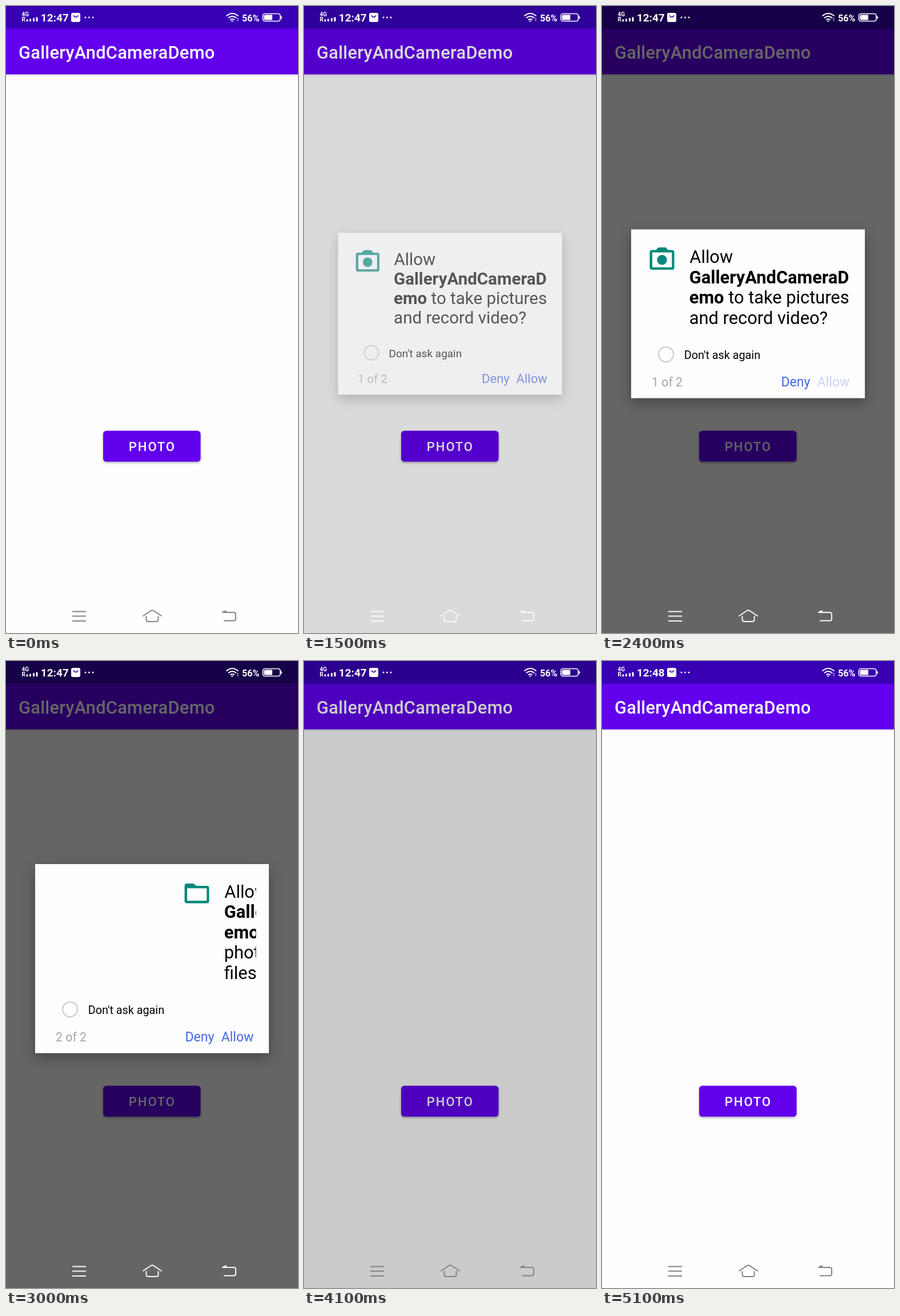
Write an HTML page that moves like this. It is 511 px wide and 1096 px high and loops after 6100 ms.

```html
<!DOCTYPE html>
<html lang="en">
<head>
<meta charset="utf-8">
<title>Permission dialogs</title>
<style>
  html, body { margin: 0; width: 100%; height: 100%; overflow: hidden; background: #fefdff; }
  svg { display: block; width: 100%; height: 100%; font-family: Roboto, sans-serif; }
  .line { fill: none; stroke-width: 2; }
  .bold { font-weight: 700; }
  .medium { font-weight: 500; fill: #fff; }
  .ask { font-size: 30.8px; }
  .action { font-size: 23px; fill: #4169e1; }
  #card { filter: drop-shadow(0 8px 11px rgba(0, 0, 0, .32)); }
  #dialog { transform-origin: 255.5px 538px; }
</style>
</head>
<body>
<svg viewBox="0 0 511 1096">
  <defs>
    <clipPath id="window"><rect x="74" y="355" width="363.5" height="230"/></clipPath>
    <linearGradient id="shade" x2="0" y2="1">
      <stop stop-opacity=".13"/><stop offset="1" stop-opacity="0"/>
    </linearGradient>
  </defs>

  <!-- App screen -->
  <rect width="511" height="1096" fill="#fefdff"/>
  <rect y="119" width="511" height="5" fill="url(#shade)"/>
  <rect y="39" width="511" height="80.5" fill="#6200ee"/>
  <rect width="511" height="39.5" fill="#3700b3"/>
  <text class="medium" x="22" y="91.5" font-size="30.8" letter-spacing=".25">GalleryAndCameraDemo</text>
  <rect x="170" y="742.5" width="170.5" height="54" rx="5.5" fill="#6200ee"
    style="filter: drop-shadow(0 2px 2px rgba(0, 0, 0, .3))"/>
  <rect id="ripple" x="170" y="742.5" width="170.5" height="54" rx="5.5" fill="#fff"/>
  <text class="medium" x="214.7" y="777.5" font-size="22" letter-spacing="2">PHOTO</text>
  <rect id="scrim" width="511" height="1096"/>

  <!-- Status bar -->
  <g fill="#fff" class="bold">
    <text x="27.5" y="18.3" font-size="10">4G</text>
    <text x="27.5" y="27" font-size="10">R</text>
    <path d="M35.5 23.5h3v3.5h-3zM41 22.5h3v4.5h-3zM47 21h3v6h-3zM52.5 19.5h3v7.500h-3z"/>
    <text id="clock" x="60.8" y="27" font-size="19">12:47</text>
    <rect x="114" y="12" width="16" height="16" rx="3"/>
    <path class="line" d="M118 16.500q4 6 8 0" stroke="#3700b3" style="stroke-width: 1.600"/>
    <circle cx="139" cy="20" r="1.500"/><circle cx="145.500" cy="20" r="1.500"/><circle cx="152" cy="20" r="1.500"/>
    <path class="line" stroke="#fff" d="M385.500 17.500q10.500-9 21 0M389 21q7-6 14 0M392.300 24.200q3.700-3 7.400 0"/>
    <path d="M393.300 25.500h5l-2.500 2.500zM404 22.500l1.500-2 1.500 2zM404 24.500l1.500 2 1.500-2z"/>
    <text x="413" y="26.500" font-size="16.200">56%</text>
    <rect class="line" x="449.500" y="13.500" width="30.500" height="13" rx="4" stroke="#fff" style="stroke-width: 1.700"/>
    <path d="M454 15.500h12v9h-12q-2.500 0-2.500-2.500v-4q0-2.500 2.500-2.500zM481.200 17.500q2 0 2 2.500t-2 2.500z"/>
  </g>

  <!-- Navigation bar -->
  <g id="nav" class="line">
    <path d="M116 1058.500h24M116 1066.500h24M116 1075h24"/>
    <path d="M239.500 1066.500L253.500 1057q2.500-1.500 5 0L272.500 1066.500M245.500 1066.500v6q0 3.500 3.500 3.500h14q3.500 0 3.500-3.500v-6"/>
    <path d="M386 1057l-7.500 3h20q3.500 0 3.500 3.500v7.500q0 3.500-3.500 3.500h-17.500"/>
  </g>

  <!-- Permission dialog -->
  <g id="dialog">
    <rect id="card" x="51" width="409" fill="#fefdff"/>
    <g clip-path="url(#window)">
      <g id="camera" class="ask">
        <g fill="#00897b">
          <path fill-rule="evenodd" d="M87.500 426.500h7l4-4.500h13l4 4.500h7q4 0 4 4v26.500q0 4-4 4h-35q-4 0-4-4v-26.500q0-4 4-4zM88 430.800v26h34.300v-26z"/>
          <circle cx="105" cy="443.800" r="8.700"/>
        </g>
        <text x="153.300" y="449">Allow</text>
        <text x="152.800" y="484.500" class="bold">GalleryAndCameraD</text>
        <text x="152.800" y="520"><tspan class="bold">emo</tspan> to take pictures</text>
        <text x="152.800" y="555.500">and record video?</text>
      </g>
      <g id="folder" class="ask">
        <path fill="#00897b" fill-rule="evenodd" d="M87.500 389h12l4.500 4h18.500q4 0 4 4v22.500q0 4-4 4h-35q-4 0-4-4v-26.500q0-4 4-4zM88 397.300v21.700h34.300v-21.700z"/>
        <text x="153.300" y="413.500">Allow</text>
        <text x="152.800" y="449" class="bold">GalleryAndCameraD</text>
        <text x="152.800" y="484.500"><tspan class="bold">emo</tspan> to access</text>
        <text x="152.800" y="520">photos, media, and</text>
        <text x="152.800" y="555.500">files on your device?</text>
      </g>
    </g>
    <circle class="line" cx="112" cy="609" r="13" stroke="#c9c8cd"/>
    <text x="143.800" y="617" font-size="19.800">Don't ask again</text>
    <text id="count" x="87" y="664.500" font-size="21.300" fill="#a5a4a8">1 of 2</text>
    <text class="action" x="313.500" y="664.500">Deny</text>
    <text class="action" id="allow" x="376.700" y="664.500">Allow</text>
  </g>
</svg>
<script>
const LOOP = 6100, STEP = 100;
const $ = id => document.getElementById(id);

// Keys are [time, value] pairs, joined by straight lines.
const tracks = {
  ripple: [[1100, 0], [1200, .08], [1300, .16], [1400, .1], [1500, 0]],
  dim: [[1400, 0], [1500, .14], [1600, .42], [1700, .575], [1800, .6], [3900, .6], [4000, .42], [4100, .2], [4200, 0]],
  alpha: [[1400, 0], [1500, .6], [1600, 1], [3900, 1], [4000, .3], [4100, 0]],
  scale: [[1400, .9], [1500, .958], [1600, .99], [1700, 1]],
  top: [[2400, 390.5], [2500, 372], [2600, 355]],
  leave: [[2400, 0], [2500, -130], [2600, -400]],
  enter: [[2900, 400], [3000, 229], [3100, 60], [3200, 10], [3300, 0]],
  press: [[2300, 1], [2400, .28], [2500, .65], [2600, 1], [3800, 1], [3900, .28]]
};

function at(name, t) {
  const keys = tracks[name];
  const i = keys.findIndex(k => k[0] >= t);
  if (i < 0) return keys[keys.length - 1][1];
  if (i === 0) return keys[0][1];
  const [t0, a] = keys[i - 1], [t1, b] = keys[i];
  return a + (b - a) * (t - t0) / (t1 - t0);
}

const set = (id, name, value) => $(id).setAttribute(name, value);
const shift = (id, x) => set(id, 'transform', `translate(${x} 0)`);

function draw(t) {
  const top = at('top', t);
  set('ripple', 'opacity', at('ripple', t));
  set('scrim', 'opacity', at('dim', t));
  set('dialog', 'opacity', at('alpha', t));
  $('dialog').style.transform = `scale(${at('scale', t)})`;
  set('card', 'y', top);
  set('card', 'height', 685.5 - top);
  shift('camera', at('leave', t));
  shift('folder', at('enter', t));
  set('allow', 'opacity', at('press', t));
  set('nav', 'stroke', t >= 1500 && t < 4100 ? '#fafafa' : '#828187');
  $('count').textContent = t < 2600 ? '1 of 2' : '2 of 2';
  $('clock').textContent = t < 5100 ? '12:47' : '12:48';
}

const start = performance.now();
function tick() {
  const t = (performance.now() - start) % LOOP;
  draw(Math.floor(t / STEP) * STEP);
  requestAnimationFrame(tick);
}
tick();
</script>
</body>
</html>
```
